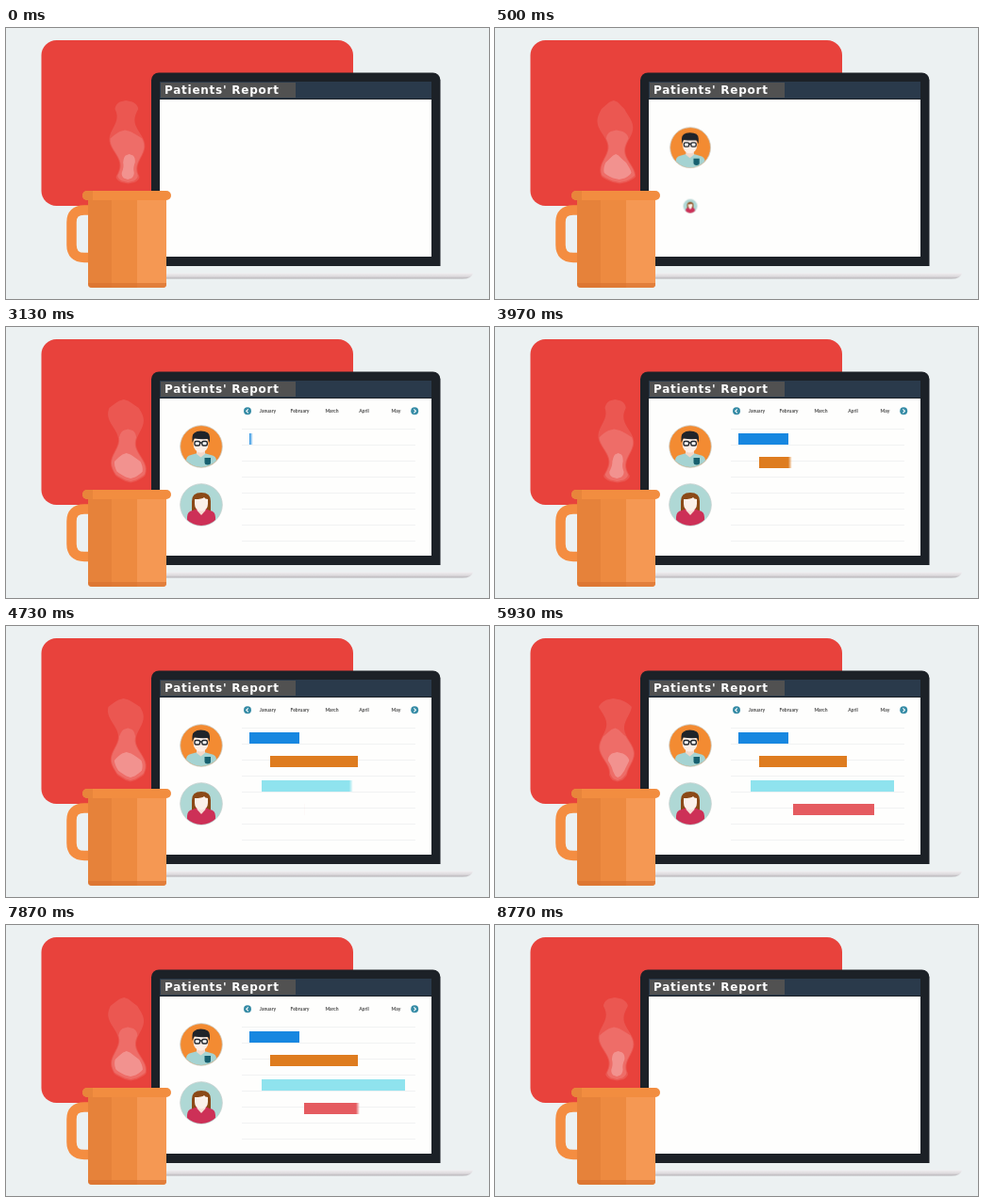
An HTML page for the animation above (8.81 s loop, 512x288 px).

```html
<!DOCTYPE html>
<html lang="en">
<head>
<meta charset="utf-8">
<title>Patients' Report</title>
<style>
  html, body { margin: 0; width: 100%; height: 100%; overflow: hidden; background: #ecf1f2; }
  .stage { position: absolute; left: 0; top: 0; width: 512px; height: 288px; overflow: hidden; }
  svg { display: block; }
  .title { font: bold 12px "DejaVu Sans", sans-serif; letter-spacing: .75px; fill: #fff; }
  .months text { font: bold 5px Lato, sans-serif; text-anchor: middle; fill: #4a4a4a; }

  .avatar, .months, .rules, .bar { animation: 8810ms linear infinite both; }
  .avatar { transform-box: fill-box; transform-origin: center; }
  .first { animation-name: first; }
  .second { animation-name: second; }
  .months { animation-name: months; }
  .rules { animation-name: rules; }

  @keyframes first {
    0%, 1.2% { transform: scale(0); opacity: 1; animation-timing-function: ease-out; }
    6.5%, 93.6% { transform: none; opacity: 1; }
    98.8%, 100% { transform: none; opacity: 0; }
  }
  @keyframes second {
    0%, 4.5% { transform: scale(0); opacity: 1; animation-timing-function: ease-out; }
    10%, 93.6% { transform: none; opacity: 1; }
    98.8%, 100% { transform: none; opacity: 0; }
  }
  @keyframes months {
    0%, 11% { opacity: 0; }
    14.8%, 93% { opacity: 1; }
    98.5%, 100% { opacity: 0; }
  }
  @keyframes rules {
    0%, 11% { opacity: 0; }
    22%, 93% { opacity: 1; }
    98.5%, 100% { opacity: 0; }
  }

  /* Each bar is revealed by sliding a mask with a soft leading edge. */
  .bar {
    position: absolute; left: var(--x); top: var(--y); width: var(--w); height: 12.5px;
    --hidden: calc(-4px - var(--w));
    -webkit-mask: linear-gradient(90deg, #000 calc(100% - 4px), transparent) 0 0 / calc(100% + 4px) 100% no-repeat;
    mask: linear-gradient(90deg, #000 calc(100% - 4px), transparent) 0 0 / calc(100% + 4px) 100% no-repeat;
    animation-timing-function: cubic-bezier(.37, 0, .63, 1);
  }
  .blue   { --x: 257.5px; --y: 112.5px; --w: 53.5px;  background: #1787e0; animation-name: blue; }
  .orange { --x: 279.5px; --y: 137.5px; --w: 93.5px;  background: #de7c1f; animation-name: orange; }
  .cyan   { --x: 270.5px; --y: 163.5px; --w: 152.5px; background: #8fe3ee; animation-name: cyan; }
  .red    { --x: 316px;   --y: 188.5px; --w: 85.5px;  background: #e55b60; animation-name: red; }

  @keyframes blue {
    0%, 33.37%, 98.52%, 100% { -webkit-mask-position: var(--hidden) 0; mask-position: var(--hidden) 0; }
    45.52%, 93.08% { -webkit-mask-position: 0 0; mask-position: 0 0; }
  }
  @keyframes orange {
    0%, 40.07%, 97.05%, 100% { -webkit-mask-position: var(--hidden) 0; mask-position: var(--hidden) 0; }
    52.21%, 91.37% { -webkit-mask-position: 0 0; mask-position: 0 0; }
  }
  @keyframes cyan {
    0%, 46.69%, 95.35%, 100% { -webkit-mask-position: var(--hidden) 0; mask-position: var(--hidden) 0; }
    58.83%, 89.67% { -webkit-mask-position: 0 0; mask-position: 0 0; }
  }
  @keyframes red {
    0%, 53.35%, 93.08%, 100% { -webkit-mask-position: var(--hidden) 0; mask-position: var(--hidden) 0; }
    65.49%, 86.83% { -webkit-mask-position: 0 0; mask-position: 0 0; }
  }
</style>
</head>
<body>
<div class="stage">
<svg width="512" height="288" viewBox="0 0 512 288">
  <defs>
    <clipPath id="disc1"><circle cx="207" cy="127" r="22"/></clipPath>
    <clipPath id="disc2"><circle cx="207" cy="189" r="22"/></clipPath>
    <clipPath id="mug"><path d="M87 178H170V272a4 4 0 0 1-4 4H91a4 4 0 0 1-4-4Z"/></clipPath>
    <linearGradient id="base" x2="0" y2="1">
      <stop offset="0" stop-color="#f0eef0"/><stop offset=".6" stop-color="#dcd9dc"/><stop offset="1" stop-color="#b3b0b4"/>
    </linearGradient>
  </defs>

  <rect width="512" height="288" fill="#ecf1f2"/>
  <rect x="37.5" y="13" width="330.5" height="176" rx="16" fill="#e8423c"/>

  <g id="steam" fill="#fff">
    <path opacity=".11"/>
    <path opacity=".13"/>
    <path opacity=".26"/>
  </g>

  <!-- laptop -->
  <path d="M120 260.5H495Q494 266.500 484 266.500H120Z" fill="url(#base)"/>
  <path d="M154 253V55.500a8 8 0 0 1 8-8H452.500a8 8 0 0 1 8 8V253Z" fill="#1c2127"/>
  <rect x="163" y="57" width="288" height="186" fill="#fefefd"/>
  <rect x="163" y="57" width="288" height="18.500" fill="#2a3a4b"/>
  <rect x="163" y="75" width="288" height="1" fill="#1c2127"/>
  <rect x="164" y="58" width="143" height="16" fill="#515151"/>
  <text class="title" x="168" y="69.500">Patients' Report</text>

  <g class="rules" id="rules" stroke="#eeeff0" stroke-width=".8"></g>
  <g class="months" id="months">
    <g fill="#378ca6"><circle cx="256" cy="89.300" r="4"/><circle cx="433.200" cy="89.300" r="4"/></g>
    <path d="M256.800 87.300l-2 2 2 2M432.400 87.300l2 2-2 2" fill="none" stroke="#fff" stroke-width="1.100"/>
  </g>

  <!-- patients -->
  <g class="avatar first">
    <circle cx="207" cy="127" r="22.300" fill="#f38b32" stroke="#c9c9c0" stroke-width=".8"/>
    <g clip-path="url(#disc1)">
      <path d="M191 150v-8q0-5 5-6l7-2h7l7 2q6 1 6 6v8Z" fill="#a5d3d2"/>
      <path d="M202 130h9v5l-4.500 3.500L202 135Z" fill="#f3d9cb"/>
      <ellipse cx="206.500" cy="124" rx="8" ry="9.500" fill="#fbeee7"/>
      <path d="M197.500 123v-6q0-6 9-6.500 9.500 0 9.500 6.500v6l-2-4q-8 .5-14.500-.5Z" fill="#20242a"/>
      <g fill="#fff" stroke="#20242a" stroke-width="1.400">
        <rect x="200" y="121.500" width="5.500" height="4.500" rx="1.500"/>
        <rect x="207.800" y="121.500" width="5.500" height="4.500" rx="1.500"/>
        <path d="M205.500 123h2.300"/>
      </g>
      <path d="M210.500 139h6.500v5q0 2.500-3.200 2.500t-3.300-2.500Z" fill="#17606f"/>
    </g>
  </g>
  <g class="avatar second">
    <circle cx="207" cy="189" r="22.300" fill="#afd8d5" stroke="#c4cfcd" stroke-width=".8"/>
    <g clip-path="url(#disc2)">
      <path d="M197 196v-11q0-9 10-9t10 9v11Z" fill="#8b4917"/>
      <path d="M192 212v-10q0-6 6-7l5-2h8l5 2q6 1 6 7v10Z" fill="#cd3057"/>
      <path d="M202.500 190h9v5l-4.500 5-4.500-5Z" fill="#f5ddd3"/>
      <path d="M200 183q8 0 10-2 1 2 4 2v5q0 7-7 7.500-7-.5-7-7.500Z" fill="#fbf0ea"/>
    </g>
  </g>

  <!-- mug -->
  <path d="M90 193.500H83q-13.500 0-13.500 13v24q0 13.500 13.500 13.500h7" fill="none" stroke="#f48d41" stroke-width="10.500"/>
  <g clip-path="url(#mug)">
    <rect x="87" y="178" width="83" height="98" fill="#e6823a"/>
    <rect x="112" y="178" width="27" height="98" fill="#ed8a40"/>
    <rect x="139" y="178" width="31" height="98" fill="#f59853"/>
    <rect x="87" y="271" width="83" height="5" fill="#d97230" opacity=".65"/>
  </g>
  <rect x="81" y="173" width="94" height="10" rx="5" fill="#f28d40"/>
  <path d="M92 173h-6a5 5 0 0 0 0 10h6Z" fill="#e8853b"/>
</svg>
<div class="bar blue"></div>
<div class="bar orange"></div>
<div class="bar cyan"></div>
<div class="bar red"></div>
</div>
<script>
  const LOOP = 8810;
  const make = (parent, tag, attrs, text = "") => {
    const el = document.createElementNS("http://www.w3.org/2000/svg", tag);
    for (const key in attrs) el.setAttribute(key, attrs[key]);
    el.textContent = text;
    document.getElementById(parent).append(el);
  };

  ["January", "February", "March", "April", "May"].forEach((name, i) =>
    make("months", "text", { x: 277.5 + 34 * i, y: 91 }, name));
  for (let y = 108.5; y < 230; y += 17) make("rules", "path", { d: `M250 ${y}H434` });

  // Steam: a column whose bulges travel upward; [time, waves passed].
  const drift = [[0, 0], [1330, 1], [3130, 2.5], [4730, 3.55], [5930, 4.8], [7870, 6.45], [LOOP, 7]];
  const waves = t => {
    const i = drift.findIndex(([end]) => end > t);
    const [t0, p0] = drift[i - 1], [t1, p1] = drift[i];
    return p0 + (p1 - p0) * (t - t0) / (t1 - t0);
  };

  function puff(top, bottom, grow, phase) {
    const left = [], right = [];
    for (let y = top; y <= bottom; y += 1.5) {
      const a = 2 * Math.PI * ((y - 122) / 52 + phase);
      const end = Math.min(1, Math.sqrt((y - top) / 9), Math.sqrt((bottom - y) / 7));
      const half = (13 + 4.5 * Math.cos(a) + grow) * end;
      const mid = 126 + (y - 78) / 18 + 1.5 * Math.sin(a);
      left.push(`${(mid - half).toFixed(2)} ${y}`);
      right.unshift(`${(mid + half).toFixed(2)} ${y}`);
    }
    return `M${left.concat(right).join("L")}Z`;
  }

  const layers = document.querySelectorAll("#steam path");
  const spans = [[77, 165.5, 1], [108.5, 164, 0], [134, 161, -3]];
  const start = performance.now();
  function draw() {
    const phase = waves((performance.now() - start) % LOOP);
    layers.forEach((layer, i) => layer.setAttribute("d", puff(...spans[i], phase)));
    requestAnimationFrame(draw);
  }
  draw();
</script>
</body>
</html>
```
